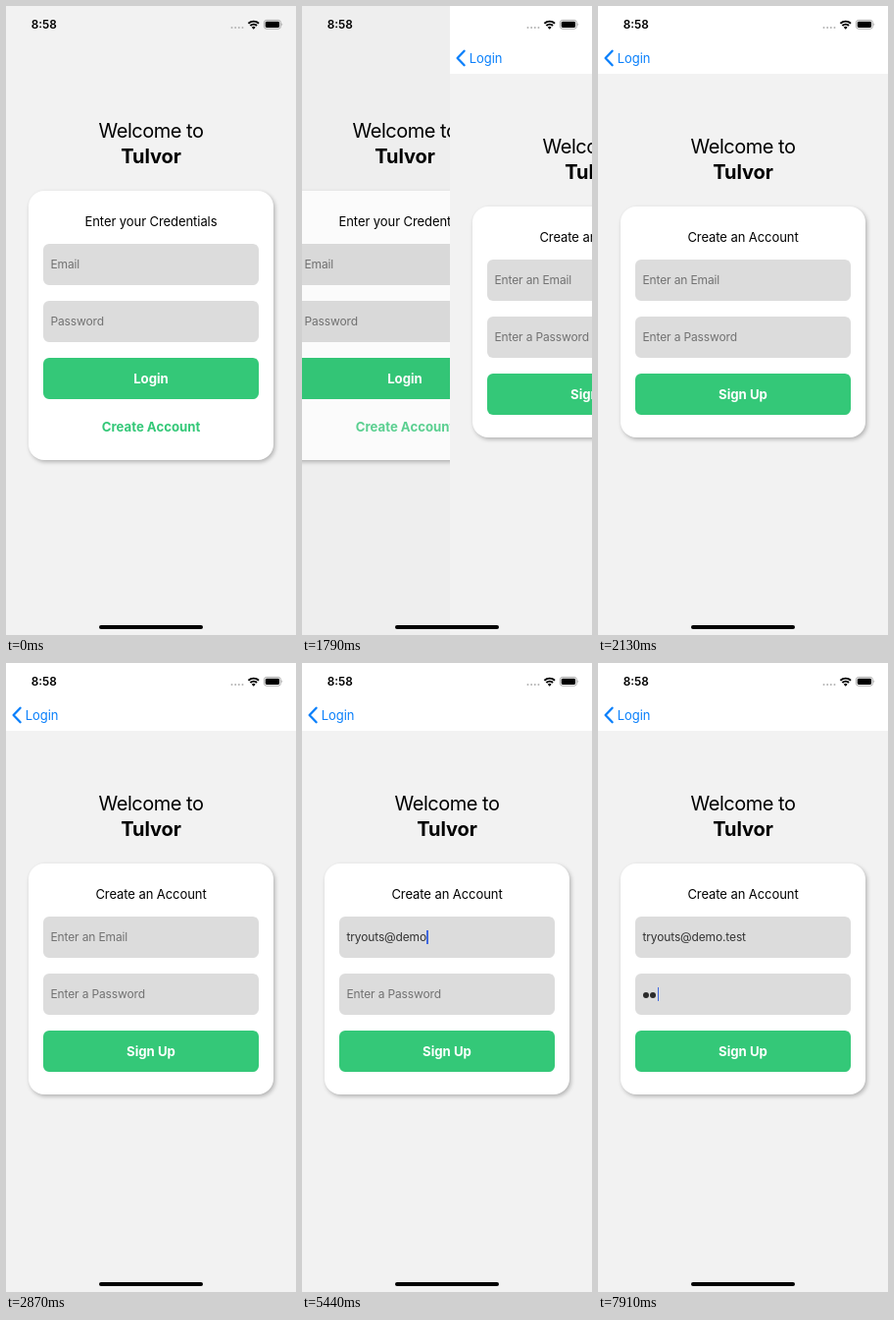
An HTML page for the animation above (8000 ms loop, 296 px wide and 640 px high).

```html
<!DOCTYPE html>
<html lang="en">
<head>
<meta charset="utf-8">
<title>Sign up</title>
<style>
  html, body { margin: 0; width: 100%; height: 100%; overflow: hidden; }
  body { font: 13px/20px Inter, "Open Sans", sans-serif; font-optical-sizing: none; color: #000; }
  #stage { position: relative; width: 296px; height: 640px; overflow: hidden; background: #f2f2f2; }
  .page, .dim, .status { position: absolute; inset: 0; }
  .page { background: #f2f2f2; }
  .dim { background: #000; opacity: 0; }
  #signup { transform: translateX(296px); }

  .line { position: absolute; left: 0; width: 100%; text-align: center; white-space: pre; letter-spacing: -.07px; }
  .title { font-size: 20px; letter-spacing: -.5px; }
  .brand { font-size: 20px; font-weight: 700; letter-spacing: -.1px; }
  .bold { font-size: 13.2px; font-weight: 700; letter-spacing: 0; }
  .link { color: #34c878; }

  .card { position: absolute; left: 23px; width: 250px; border-radius: 16px; background: #fff;
          box-shadow: 1.5px 2px 4px rgba(0, 0, 0, .27); }
  .field, .button { position: absolute; left: 15px; width: 220px; height: 42px; border-radius: 6px; line-height: 42px; }
  .field { background: #dcdcdc; color: #333; font-size: 12px; letter-spacing: -.14px; white-space: pre; }
  .field > * { position: absolute; left: 7.5px; top: 0; }
  .hint { color: #727272; }
  .button { background: #34c878; color: #fff; text-align: center; }
  .caret { position: absolute; left: 100%; top: 13.5px; width: 1.5px; height: 14.5px; background: #3f68e0; opacity: 0; }
  .dot { display: inline-block; width: 6.2px; height: 6.2px; margin-right: 1.4px; border-radius: 50%; background: #2b2b2b; }

  .header { position: absolute; left: 0; top: 0; width: 100%; height: 69px; background: #fff; color: #087ffb; }
  .header span { position: absolute; left: 19.7px; top: 43px; letter-spacing: -.05px; }
  svg { position: absolute; left: 0; top: 0; }
  .clock { position: absolute; left: 25.7px; top: 9px; font-size: 11.8px; font-weight: 600; }
  .home { position: absolute; left: 95px; top: 629.7px; width: 106px; height: 4.3px; border-radius: 3px; background: #000; }
</style>
</head>
<body>
<div id="stage">
  <div class="page" id="login">
    <div class="line title" style="top:117px">Welcome to</div>
    <div class="line brand" style="top:142.5px">Tulvor</div>
    <div class="card" style="top:188px;height:274px">
      <div class="line" style="top:21px">Enter your Credentials</div>
      <div class="field" style="top:54px"><span class="hint">Email</span><span><i class="caret" id="loginCaret"></i></span></div>
      <div class="field" style="top:112px"><span class="hint">Password</span></div>
      <div class="button bold" style="top:170px">Login</div>
      <div class="line bold link" id="create" style="top:229.5px">Create Account</div>
    </div>
    <div class="dim" id="dim"></div>
  </div>

  <div class="page" id="signup">
    <div class="header">
      <svg width="30" height="69"><path d="M14.6 45.8 7.6 53l7 7.2" fill="none" stroke="#087ffb" stroke-width="2.3" stroke-linecap="round" stroke-linejoin="round"/></svg>
      <span>Login</span>
    </div>
    <div class="line title" style="top:133px">Welcome to</div>
    <div class="line brand" style="top:158.5px">Tulvor</div>
    <div class="card" style="top:204px;height:235px">
      <div class="line" style="top:21px">Create an Account</div>
      <div class="field" style="top:54px"><span class="hint" id="emailHint">Enter an Email</span><span><b id="email" style="font-weight:400"></b><i class="caret" id="emailCaret"></i></span></div>
      <div class="field" style="top:112px"><span class="hint" id="passHint">Enter a Password</span><span><i class="dot"></i><i class="dot"></i></span><i class="caret" id="passCaret"></i></div>
      <div class="button bold" style="top:170px">Sign Up</div>
    </div>
  </div>

  <div class="status">
    <span class="clock">8:58</span>
    <svg width="296" height="40" fill="none">
      <path d="M230.5 22h12" stroke="#b4b4b4" stroke-width="2" stroke-linecap="round" stroke-dasharray="0 3.65"/>
      <path d="M247.4 17.8a7.6 7.6 0 0 1 10.6 0M249.4 20a4.7 4.7 0 0 1 6.6 0" stroke="#000" stroke-width="1.9"/>
      <path d="M252.7 23.7l-1.9-1.9a2.7 2.7 0 0 1 3.8 0z" fill="#000"/>
      <rect x="263.4" y="14.4" width="17" height="8.8" rx="2.5" stroke="#999" stroke-width=".8"/>
      <rect x="264.7" y="15.7" width="14.4" height="6.2" rx="1.4" fill="#000"/>
      <path d="M281.5 17.3q1.6 1.5 0 3z" fill="#999"/>
    </svg>
    <div class="home"></div>
  </div>
</div>

<script>
const LOOP = 8000, WIDTH = 296;
const EMAIL = "tryouts@demo.test";
const emailKeys = [3430, 3690, 3880, 4060, 4170, 4320, 4420, 4790, 5050, 5160, 5300, 5440, 5650, 5960, 6100, 6280, 6430];
const passKeys = [7470, 7910];
const slideTicks = [1790, 1900, 2020, 2130];

const $ = id => document.getElementById(id);
const dots = document.querySelectorAll(".dot");
const passed = (times, t) => times.filter(time => time <= t).length;

// Value of the last [time, value] pair reached.
const held = (steps, t) => steps.reduce((value, [time, next]) => t >= time ? next : value, steps[0][1]);

// Critically damped spring, 1 at rest before the push and 0 after it.
function remaining(t) {
  const ticks = passed(slideTicks, t);
  if (!ticks) return 1;
  if (ticks === slideTicks.length) return 0;
  const u = 18.26 * (slideTicks[ticks - 1] - 1700) / 1000;
  return (1 + u) * Math.exp(-u);
}

function draw(t) {
  const rest = remaining(t);
  $("signup").style.transform = `translateX(${Math.round(rest * WIDTH)}px)`;
  $("login").style.transform = `translateX(${Math.round((rest - 1) * WIDTH * .3)}px)`;
  $("dim").style.opacity = .03 * (1 - rest);
  $("create").style.opacity = held([[0, 1], [1580, .6], [1680, .2], [1790, .8], [1900, 1]], t);

  $("loginCaret").style.opacity = held([[0, 0], [130, .5], [250, 1], [870, 0], [1110, .5], [1230, 1], [1580, 0]], t);
  $("emailCaret").style.opacity = held([[0, 0], [2990, 1], [6610, 0]], t);
  $("passCaret").style.opacity = held([[0, 0], [7120, .5], [7230, 1]], t);

  const letters = passed(emailKeys, t);
  $("email").textContent = EMAIL.slice(0, letters);
  $("emailHint").hidden = letters > 0;

  const bullets = passed(passKeys, t);
  dots.forEach((dot, i) => dot.hidden = i >= bullets);
  dots.forEach((dot, i) => dot.style.visibility = i < bullets ? "visible" : "hidden");
  $("passCaret").style.left = 7.5 + bullets * 7.5 + "px";
  $("passHint").hidden = bullets > 0;
}

function frame() {
  draw(performance.now() % LOOP);
  requestAnimationFrame(frame);
}
frame();
</script>
</body>
</html>
```
